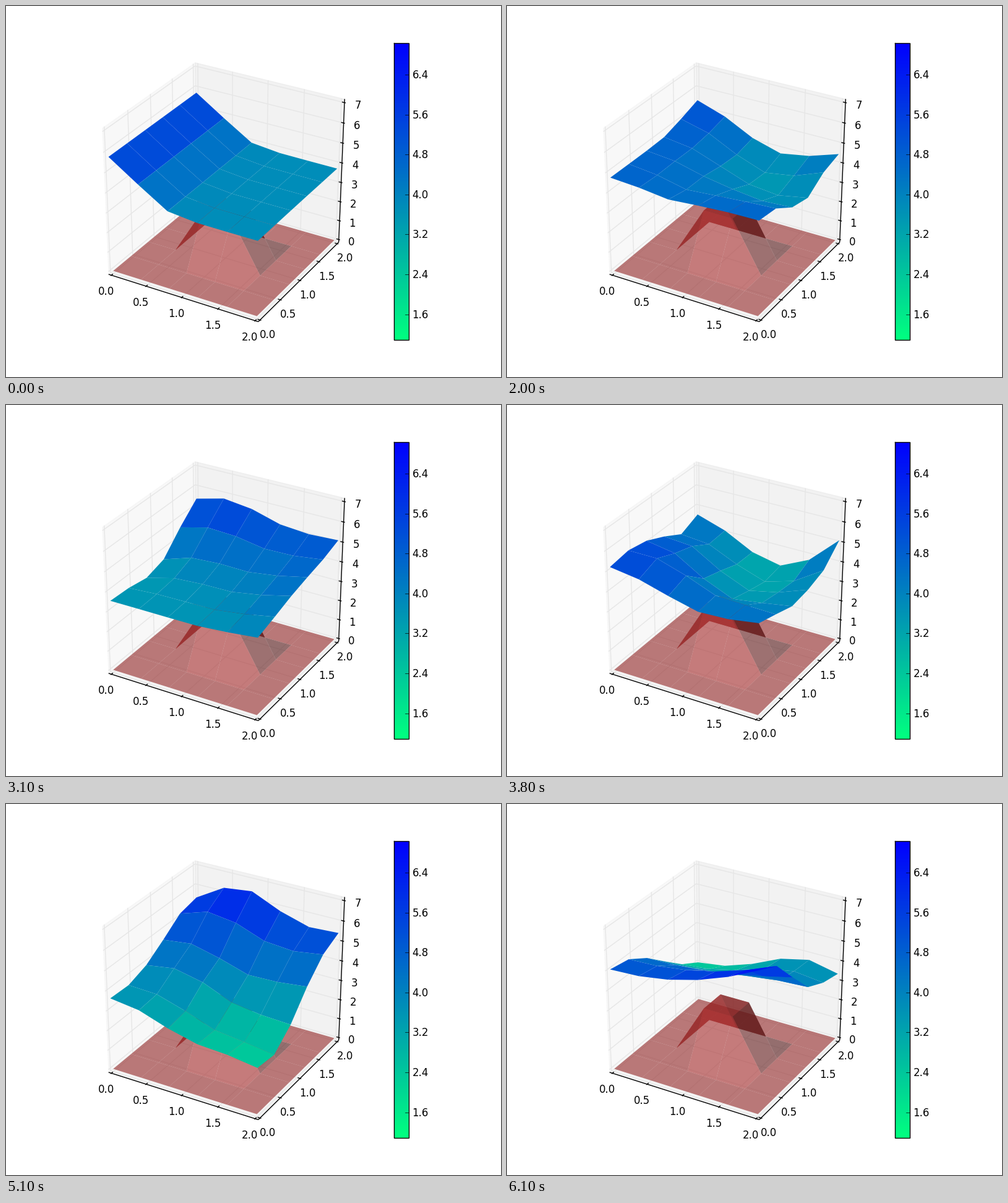
A matplotlib script for the animation above (6.2 s loop, 800 by 600 pixels).

```python
import numpy as np
import matplotlib.pyplot as plt
from matplotlib.animation import FuncAnimation
from matplotlib.collections import LineCollection, PolyCollection
from matplotlib.colors import to_rgb

plt.rcParams["font.family"] = "DejaVu Sans"

FRAMES, INTERVAL = 62, 100
N = 6                          # nodes per side
Z_MAX = 7.03
V_MIN, V_MAX = 1.09, 7.03      # colour range
E = 0.5 + 1 / 48               # half size of the padded box
ELEV, AZIM = np.radians(30), np.radians(-60)


# ---------- projection ----------

def nearness(p):
    x, y, z = np.moveaxis(np.asarray(p, float), -1, 0)
    return np.cos(ELEV) * (np.cos(AZIM) * x + np.sin(AZIM) * y) + np.sin(ELEV) * z


def project(p):
    """Map box coordinates (-0.5..0.5 on each side) to stage pixels."""
    x, y, z = np.moveaxis(np.asarray(p, float), -1, 0)
    right = -np.sin(AZIM) * x + np.cos(AZIM) * y
    up = -np.sin(ELEV) * (np.cos(AZIM) * x + np.sin(AZIM) * y) + np.cos(ELEV) * z
    dist = 10 - nearness(p)
    return np.stack([354.7 + 2681 * right / dist,
                     293.5 - 2594.6 * up / dist], axis=-1)


def cells(height):
    """Quads of a height field indexed [y, x], in box coordinates."""
    side = np.linspace(-0.5, 0.5, N)
    gx, gy = np.meshgrid(side, side)
    p = np.stack([gx, gy, height / Z_MAX - 0.5], axis=-1)
    quads = np.stack([p[:-1, :-1], p[:-1, 1:], p[1:, 1:], p[1:, :-1]], axis=2)
    return quads.reshape(-1, 4, 3)


def far_to_near(quads):
    return np.argsort(nearness(quads).mean(axis=1), kind="stable")


# ---------- water ----------

X, Y = np.meshgrid(np.arange(N), np.arange(N))


def swell(height, cx, cy, wx, wy):
    return height * np.exp(-((X - cx) / wx) ** 2 - ((Y - cy) / wy) ** 2)


def poses():
    """Yield (time, heights) for the moments the water swings through."""
    yield 0, 3.755 + swell(2.005, 0, 0, 1.25, np.inf)
    # crest on the right wall
    yield 10, (3.65 + 0.08 * Y
               + swell(1.8, 5, 0, 1.9, np.inf) * np.exp(-((Y - 1.4) / 2.6) ** 4)
               + swell(0.5, 3.5, 5, 1.8, 1.2) - swell(0.6, 2.9, 2.4, 1.1, 1.1))
    # back on the left, trough behind
    yield 20, (4.75 + swell(0.65, 0, 5, 1.2, 1.2)
               - swell(1.3, 3.1, 3.9, 1.6, 2.2)
               - swell(0.95, 4.8, 2.6, 1.3, 1.1) - swell(0.35, 2, 0.8, 1, 1.2))
    # crest on the back wall
    yield 31, (3.55 + 0.055 * Y ** 2 + swell(0.65, 5, 2.2, 1.1, 2.5)
               + swell(0.85, 1.2, 4.9, 1.6, 1.3) - swell(0.6, 0, 2.6, 0.8, 1.3))
    # front right, with a hump in the middle
    yield 46, (3.4 + swell(2.15, 5, 0, 1.9, np.inf) * (1 - Y / 11)
               + swell(1.25, 2, 1.9, 1.5, 0.9))
    # back left, front corner sinking
    yield 56, (4.2 - 0.04 * X ** 2 + swell(1.65, 0, 3.9, 1.4, 2)
               - swell(1, 5, 0, 1.5, 1.4) + swell(0.5, 3.5, 2.2, 1.8, 1.5))
    # crest on the front wall
    yield 61, (3.4 + 1.65 * np.sin(0.55 * (3 - Y))
               + 0.078 * X ** 2 * np.exp(-(Y / 2.4) ** 2)
               + swell(1.75, 4, 5, 2.2, 1.6))


def slosh(level=4.15, memory=14):
    """Let each standing wave of the basin swing at its own pitch through the poses."""
    times, heights = map(np.array, zip(*poses()))
    m = np.arange(N)
    basis = np.cos(np.pi * np.outer(m + 0.5, m) / N)
    inverse = np.linalg.inv(basis)
    modes = inverse @ (heights - level) @ inverse.T
    pitch = 2 * np.sin(np.pi * m / (2 * N))
    omega = 0.607 * np.hypot(pitch[:, None], pitch)[..., None, None]

    def kernel(t):
        # the mirrored term makes the water start at rest
        total = 0
        for lag in (t[:, None] - times, t[:, None] + times):
            total = total + np.cos(omega * lag) * np.exp(-(lag / memory) ** 2 / 2)
        return total

    target = np.moveaxis(modes, 0, -1)[..., None]
    weights = np.linalg.solve(kernel(times) + 1e-3 * np.eye(len(times)), target)
    swing = np.moveaxis((kernel(np.arange(FRAMES)) @ weights)[..., 0], -1, 0)
    return np.clip(level + basis @ swing @ basis.T, V_MIN, V_MAX)


def winter(value):
    t = np.clip((V_MAX - np.asarray(value)) / (V_MAX - V_MIN), 0, 1)
    return np.stack([np.zeros_like(t), t, 1 - t / 2], axis=-1)


# ---------- stage ----------

fig = plt.figure(figsize=(8, 6), dpi=100, facecolor="white")
ax = fig.add_axes([0, 0, 1, 1])
ax.axis("off")


def add_lines(paths, color, width, z):
    ax.add_collection(LineCollection([project(p) for p in paths], colors=color,
                                     linewidths=width, zorder=z), autolim=False)


def label(x, y, text, ha="center"):
    ax.text(x, y + 6, text, fontsize=12, ha=ha, va="baseline", zorder=6)


def draw_box():
    panes = [
        ([(-E, -E, -E), (-E, E, -E), (-E, E, E), (-E, -E, E)], 0.95),
        ([(-E, E, -E), (E, E, -E), (E, E, E), (-E, E, E)], 0.90),
        ([(-E, -E, -E), (E, -E, -E), (E, E, -E), (-E, E, -E)], 0.925),
    ]
    for corners, grey in panes:
        color = (grey, grey, grey, 0.5)
        ax.add_collection(PolyCollection([project(corners)], facecolors=[color],
                                         edgecolors=[color], linewidths=1,
                                         zorder=1), autolim=False)

    out, inn = E + 0.1 / 12, E - 0.2 / 12
    grid, ticks = [], []
    for v in np.arange(0, 2.1, 0.5):
        s = v / 2 - 0.5
        grid += [[(s, -E, -E), (s, E, -E), (s, E, E)],
                 [(E, s, -E), (-E, s, -E), (-E, s, E)]]
        ticks += [[(s, -out, -E), (s, -inn, -E)], [(out, s, -E), (inn, s, -E)]]
        px, py = project((s, -E, -E))
        label(px - 8.5, py + 26, f"{v:.1f}")
        px, py = project((E, s, -E))
        label(px + 12.5, py + 23, f"{v:.1f}")
    for v in range(8):
        s = v / Z_MAX - 0.5
        grid.append([(-E, -E, s), (-E, E, s), (E, E, s)])
        ticks.append([(out, E, s), (inn, E, s)])
        px, py = project((E, E, s))
        label(px + 20.5 + 0.15 * v, py + 3.5, str(v))
    add_lines(grid, (0.9, 0.9, 0.9), 1, 2)

    axes = [[(-E, -E, -E), (E, -E, -E)],
            [(E, -E, -E), (E, E, -E)],
            [(E, E, -E), (E, E, E)]]
    add_lines(axes + ticks, "black", 1, 3)


def draw_ground():
    ground = np.zeros((N, N))
    ground[2:4, 2:4] = 2.5
    quads = cells(ground)
    corner = ground[:-1, :-1]
    dx = (ground[:-1, 1:] - corner) / 0.4
    dy = (ground[1:, :-1] - corner) / 0.4
    light = ((dx + dy + 0.5) / np.sqrt(dx ** 2 + dy ** 2 + 1)).ravel()
    light = (light - light.min()) / np.ptp(light)
    rgba = np.full((len(quads), 4), 0.6)
    rgba[:, :3] = np.outer(0.5 + 0.5 * light, to_rgb("brown"))
    order = far_to_near(quads)
    ax.add_collection(PolyCollection(project(quads[order]), facecolors=rgba[order],
                                     edgecolors="none", linewidths=0,
                                     zorder=4), autolim=False)


def draw_colorbar():
    left, right, top, bottom = 627, 651, 60, 540
    ramp = winter(np.linspace(V_MAX, V_MIN, 256))[:, None]
    ax.imshow(ramp, extent=(left, right, bottom, top), aspect="auto",
              interpolation="nearest", zorder=5)
    ax.plot([left, right, right, left, left], [top, top, bottom, bottom, top],
            color="black", lw=1, solid_joinstyle="miter", zorder=6)
    for v in np.arange(1.6, 6.5, 0.8):
        y = bottom - (v - V_MIN) / (V_MAX - V_MIN) * (bottom - top)
        ax.plot([right - 5.6, right], [y, y], color="black", lw=0.5, zorder=6)
        label(656.5, y, f"{v:.1f}", ha="left")


draw_box()
draw_ground()
draw_colorbar()
ax.set_xlim(0, 800)
ax.set_ylim(600, 0)

water = slosh()
surface = PolyCollection([], edgecolors="none", linewidths=0, zorder=5)
ax.add_collection(surface, autolim=False)


def update(frame):
    quads = cells(water[frame])
    quads = quads[far_to_near(quads)]
    mean = (quads[..., 2].mean(axis=1) + 0.5) * Z_MAX
    surface.set_verts(project(quads))
    surface.set_facecolor(winter(mean))
    return [surface]


anim = FuncAnimation(fig, update, frames=FRAMES, interval=INTERVAL,
                     init_func=lambda: update(0), repeat=True, repeat_delay=0)
plt.show()
```
